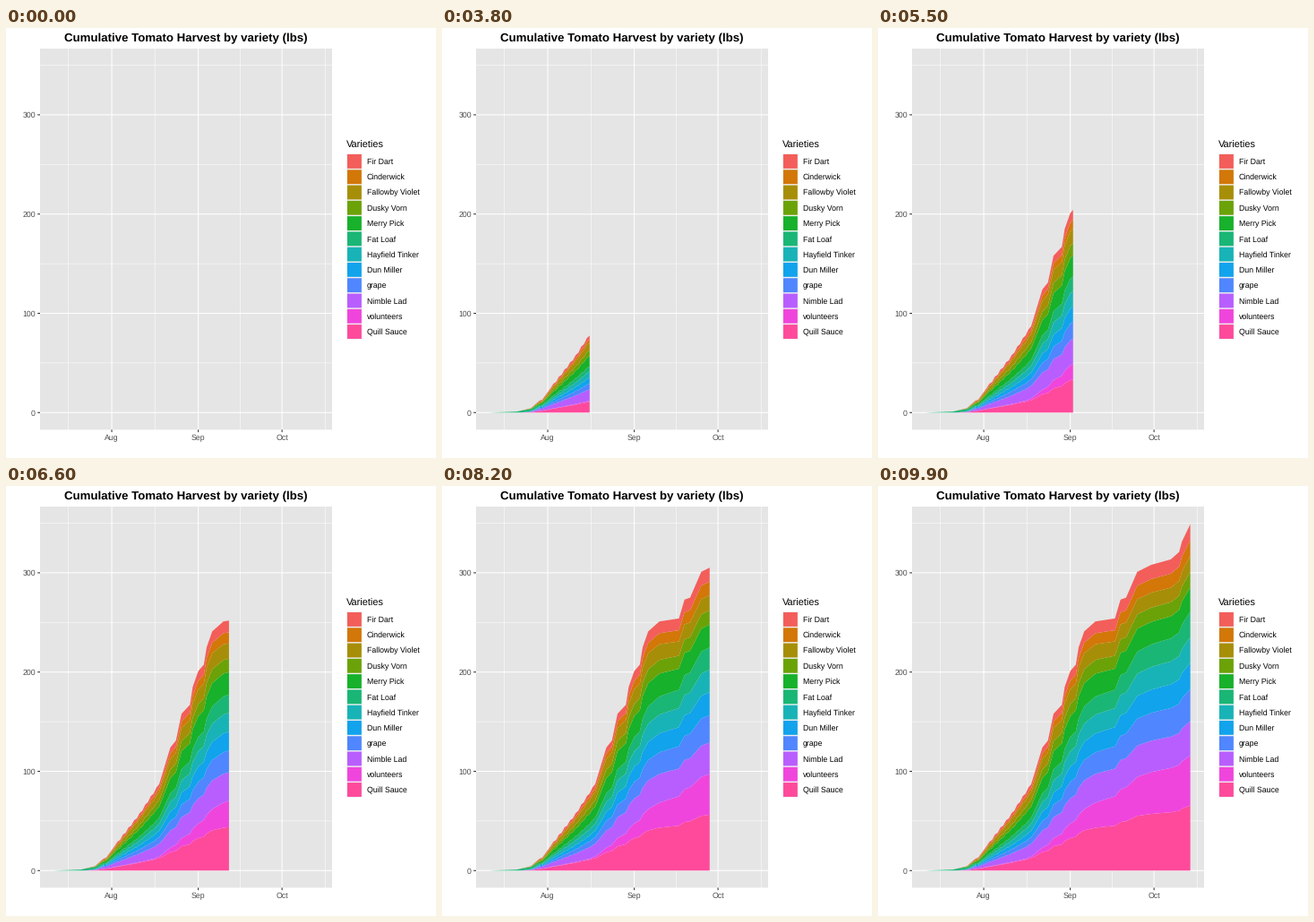
Recreate the animation shown at these times as a matplotlib script. Size 480 by 480 pixels, loop 10000 ms.

```python
import numpy as np
import matplotlib.pyplot as plt
from matplotlib.animation import FuncAnimation
from matplotlib.patches import Polygon, Rectangle

plt.rcParams["font.family"] = "Liberation Sans"
plt.rcParams["text.hinting"] = "no_hinting"

SIZE, DPI = 480, 72
FRAMES, LAST_DAY = 100, 95
LEFT, RIGHT, TOP, BOTTOM = 38, 364, 23, 448.4

# Bottom to top of the stack: name, colour, share of the harvest (%) early and late
VARIETIES = [
    ("Quill Sauce", "#FF4A9C", 14, 18.8),
    ("volunteers", "#F045DC", 1.2, 14.4),
    ("Nimble Lad", "#B85EFF", 14.8, 10),
    ("grape", "#5086FF", 7.5, 9.2),
    ("Dun Miller", "#11A3EC", 7.5, 7.6),
    ("Hayfield Tinker", "#18B3B7", 8, 7.4),
    ("Fat Loaf", "#1AB676", 7, 7.4),
    ("Merry Pick", "#17B12B", 13.5, 7),
    ("Dusky Vorn", "#6BA208", 7.5, 4.5),
    ("Fallowby Violet", "#A78E08", 9.8, 4.6),
    ("Cinderwick", "#D27708", 4.2, 4.5),
    ("Fir Dart", "#F35E5A", 5, 4.6),
]
FIRST_RIPE = 6

# Where the running total (day, lbs) changes pace
PACE = [(0, 0), (10, 1), (15, 4.5), (18, 12), (19, 13), (22, 24.5), (31, 57),
        (38, 87), (42, 124), (44, 131), (46, 158), (49, 167), (50, 185),
        (52, 201), (54, 207.5), (55, 225), (57, 241), (61, 251), (68, 254),
        (70, 273), (72, 275), (76, 301), (81, 308), (88, 313.5), (91, 321),
        (92, 331.5), (95, 349)]


def px(day):
    return 52.6 + 3.116 * day


def py(lbs):
    return 429.3 - 1.108 * lbs


def build_edges():
    days = np.arange(LAST_DAY + 1)
    total = np.interp(days, *zip(*PACE))
    # Midsummer pickings are larger every other day
    total += np.where((days > 22) & (days < 38), 0.9 * (days % 2 * 2 - 1), 0)

    early, late = (np.array(col)[:, None] / 100 for col in list(zip(*VARIETIES))[2:])
    first = np.eye(len(VARIETIES))[FIRST_RIPE][:, None]
    spread = np.clip((days - 10) / 8, 0, 1)
    season = 1 - (1 - np.clip((days - 36) / (LAST_DAY - 36), 0, 1)) ** 2
    shares = first + (early - first) * spread + (late - early) * season
    edges = np.vstack([0 * total, total * np.cumsum(shares, axis=0)])
    return px(days), py(edges)


fig = plt.figure(figsize=(SIZE / DPI, SIZE / DPI), dpi=DPI, facecolor="white")
ax = fig.add_axes([0, 0, 1, 1])
ax.set(xlim=(0, SIZE), ylim=(SIZE, 0))
ax.axis("off")


def box(x, y, w, h, color, z=0):
    ax.add_patch(Rectangle((x, y), w, h, fc=color, lw=0, zorder=z, snap=False))


def line(xs, ys, color="white", width=1.07):
    ax.plot(xs, ys, color=color, lw=width, solid_capstyle="butt", zorder=1, snap=False)


def label(x, y, text, size=8.8, color="black", ha="left", **kw):
    ax.text(x, y, text, fontsize=size, color=color, ha=ha, va="baseline", **kw)


def draw_panel():
    box(LEFT, TOP, RIGHT - LEFT, BOTTOM - TOP, "#E5E5E5")
    for day in (5.5, 36.5, 67, 97.5):
        line([px(day)] * 2, [TOP, BOTTOM], width=0.53)
    for lbs in range(50, 400, 100):
        line([LEFT, RIGHT], [py(lbs)] * 2, width=0.53)
    for day, month in ((21, "Aug"), (52, "Sep"), (82, "Oct")):
        x = px(day)
        line([x, x], [TOP, BOTTOM])
        line([x, x], [BOTTOM, BOTTOM + 2.74], "#333333")
        label(x, 460, month, color="#4D4D4D", ha="center")
    for lbs in range(0, 400, 100):
        y = py(lbs)
        line([LEFT, RIGHT], [y, y])
        line([LEFT - 2.74, LEFT], [y, y], "#333333")
        label(33, y + 3.2, str(lbs), color="#4D4D4D", ha="right")
    label(200.6, 15, "Cumulative Tomato Harvest by variety (lbs)", 13.2,
          ha="center", weight="bold")


def draw_legend():
    key = 17.28
    label(380, 134, "Varieties", 11)
    box(380.3, 140.3, key, key * len(VARIETIES), "#F0F0F0")
    for i, (name, color, *_) in enumerate(reversed(VARIETIES)):
        y = 140.3 + key * i
        box(381, y + 0.7, key - 1.42, key - 1.42, color, 1)
        label(403, y + key / 2 + 3.1, name)


draw_panel()
draw_legend()
xs, edges = build_edges()
areas = [ax.add_patch(Polygon([(0, 0)] * 3, fc=color, lw=0, zorder=2))
         for _, color, *_ in VARIETIES]


def update(frame):
    # The reveal advances in whole days
    day = round(frame * LAST_DAY / (FRAMES - 1))
    x = xs[:day + 1]
    for area, low, high in zip(areas, edges, edges[1:]):
        area.set_visible(day > 0)
        outline_x = np.concatenate([x, x[::-1]])
        outline_y = np.concatenate([high[:day + 1], low[day::-1]])
        area.set_xy(np.column_stack([outline_x, outline_y]))
    return areas


anim = FuncAnimation(fig, update, frames=FRAMES, interval=100,
                     repeat=True, repeat_delay=0, blit=False)
plt.show()
```
